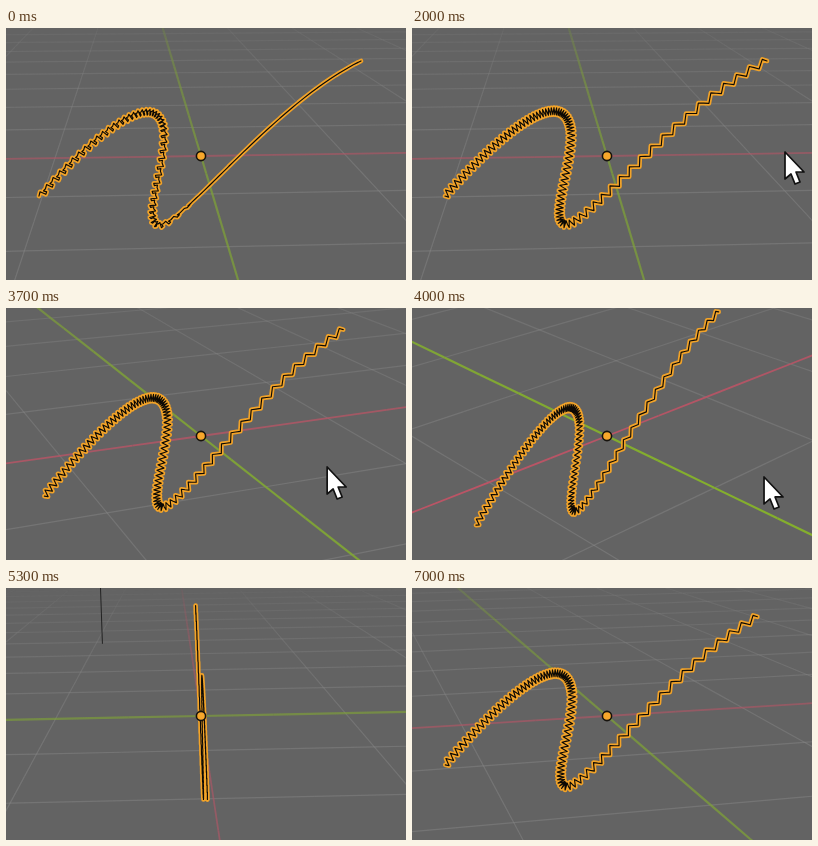
These frames come from a looping animation (400x252 px, 7400 ms). An HTML page with a canvas:

```html
<!DOCTYPE html>
<html>
<head>
<meta charset="utf-8">
<style>
html, body { margin: 0; width: 100%; height: 100%; overflow: hidden; background: #636363; }
canvas { display: block; }
</style>
</head>
<body>
<canvas id="stage" width="400" height="252"></canvas>
<script>
const ctx = document.getElementById('stage').getContext('2d');
const LOOP = 7400, DIST = 1000, CELL = 145, CX = 195, CY = 128;

const clamp = (v, lo, hi) => Math.min(hi, Math.max(lo, v));
const mix = (a, b, p) => a + (b - a) * p;
const rad = deg => deg * Math.PI / 180;

// Orbit of the view: front, raised corner, side, low corner, rest
const orbit = [
  { at: 3400, yaw: 3.85, elev: 13 },
  { at: 4000, yaw: 42, elev: 25.8 },
  { at: 5300, yaw: 91.6, elev: 11.8 },
  { at: 6000, yaw: 50, elev: 9.2 },
  { at: 6800, yaw: 15.1, elev: 13.4 }
];

function viewAt(t) {
  const next = orbit.findIndex(k => k.at > t);
  const b = orbit.at(next), a = next > 0 ? orbit[next - 1] : b;
  const p = a === b ? 0 : (t - a.at) / (b.at - a.at);
  const yaw = mix(a.yaw, b.yaw, p);
  return { yaw, elev: mix(a.elev, b.elev, p), roll: .0144 * (yaw / 91.6) ** 4 };
}

// The orbit is dragged by the pointer; before that it glides twice
function pointerAt(t, view) {
  if (t < 2900) {
    const p = clamp((t - 2000) / 400, 0, 1);
    return [mix(373, 283, p), mix(124, 135, p) - 8 * Math.sin(p * Math.PI)];
  }
  if (t < 3400) {
    const p = clamp((t - 3100) / 300, 0, 1);
    return [mix(338, 290, p), mix(170, 149, p)];
  }
  const back = t > 5300 ? 1 : 0;
  return [284 + 1.62 * view.yaw - 15 * back, 149 + 1.56 * (view.elev - 13) - 11 * back];
}

// The picture moves in 100 ms steps, coarser around the turn and the end
function stepTime(t) {
  const coarse = from => Math.max(from, Math.floor(t / 300) * 300);
  if (t >= 5800) return coarse(5800);
  if (t >= 4800 && t < 5300) return coarse(4800);
  return Math.floor(t / 100) * 100;
}

// Curve seen from the front: three joined cubics, with waves on each
const controls = [
  [33, 168], [94, 99], [154, 55], [159, 104], [161, 135],
  [138, 190], [152, 196], [172, 204], [266, 76], [355, 33]
];
const WAVES = [42, 21, 21];

// Undo the front view's projection onto the upright plane
function toWorld(sx, sy) {
  const u = sx - CX, v = CY - sy, k = 1 + (.065 * u - .224 * v) / DIST;
  const x = u * k / .9977;
  return [x, 0, (k * v - .015 * x) / .974];
}

function offsetPoint(part, t, off) {
  const [a, b, c, d] = controls.slice(part * 3, part * 3 + 4), s = 1 - t;
  const at = i => s*s*s*a[i] + 3*s*s*t*b[i] + 3*s*t*t*c[i] + t*t*t*d[i];
  const slope = i => s*s*(b[i]-a[i]) + 2*s*t*(c[i]-b[i]) + t*t*(d[i]-c[i]);
  const dx = slope(0), dy = slope(1), len = Math.hypot(dx, dy);
  return toWorld(at(0) - dy / len * off, at(1) + dx / len * off);
}

// Repeat a pattern of [phase, offset] along the curve
function buildCurve(pattern, density, strength) {
  const pts = [];
  WAVES.forEach((waves, part) => {
    const n = waves * density;
    for (let i = 0; i < n; i++) for (const [phase, off] of pattern) {
      const t = (i + phase) / n;
      pts.push(offsetPoint(part, t, off * strength(part + t)));
    }
  });
  pts.push(toWorld(355, 33));
  return pts;
}

const zigzag = buildCurve([[0, 0], [.25, 3.5], [.75, -3.5]], 1, () => 1);
const barbed = buildCurve([[0, 0], [.4, -2], [.6, 4], [.85, 3], [.7, 0]], 2 / 3,
  s => clamp((2.33 - s) * 3, 0, 1));

function camera({ yaw, elev, roll }) {
  const ca = Math.cos(rad(yaw)), sa = Math.sin(rad(yaw));
  const ce = Math.cos(rad(elev)), se = Math.sin(rad(elev));
  return ([x, y, z]) => {
    const h = x * ca - y * sa, d = x * sa + y * ca;
    const depth = DIST + d * ce - z * se, k = DIST / depth;
    const px = h * k, py = (z * ce + d * se) * k;
    return [CX + px - py * roll, CY - py - px * roll, depth];
  };
}

function stroke(pts, color, width) {
  ctx.beginPath();
  pts.forEach(p => ctx.lineTo(p[0], p[1]));
  ctx.strokeStyle = color;
  ctx.lineWidth = width;
  ctx.stroke();
}

// Floor line in short pieces that fade with distance
function floorLine(project, place, rgb, strength, width) {
  const step = CELL / 2;
  for (let i = -28; i < 32; i++) {
    const a = project(place(i * step)), b = project(place((i + 1) * step));
    if (a[2] < 60 || b[2] < 60) continue;
    const alpha = strength * clamp(1.1 - (a[2] - 700) / 1900, 0, 1);
    if (alpha > 0) stroke([a, b], `rgba(${rgb},${alpha})`, width);
  }
}

function drawFloor(project, elev) {
  for (let k = -12; k <= 14; k++) if (k) {
    floorLine(project, s => [s, k * CELL, 0], '150,150,150', .34, 1.2);
    floorLine(project, s => [k * CELL, s, 0], '150,150,150', .34, 1.2);
  }
  const glow = Math.min(1, .15 + 1.9 * Math.sin(rad(elev)));
  floorLine(project, s => [s, 0, 0], '190,84,102', glow, 1.8);
  floorLine(project, s => [0, s, 0], '134,178,44', glow, 2.2);
}

function drawPointer([x, y]) {
  ctx.save();
  ctx.translate(x, y);
  const arrow = new Path2D('M0 0V27L6 22L10 32L15 30L11 20H19Z');
  ctx.fillStyle = '#fff';
  ctx.fill(arrow);
  ctx.strokeStyle = '#111';
  ctx.lineWidth = 1.7;
  ctx.stroke(arrow);
  ctx.restore();
}

function drawOrigin() {
  ctx.beginPath();
  ctx.arc(CX, CY, 4.6, 0, 7);
  ctx.fillStyle = '#f7a72b';
  ctx.fill();
  ctx.strokeStyle = '#15120c';
  ctx.lineWidth = 1.6;
  ctx.stroke();
}

function draw(t) {
  const time = stepTime(t), view = viewAt(time), project = camera(view);
  ctx.lineJoin = 'round';
  ctx.lineCap = 'butt';
  ctx.fillStyle = '#636363';
  ctx.fillRect(0, 0, 400, 252);
  drawFloor(project, view.elev);

  // Upright line of the lamp
  stroke([project([560, 135, 0]), project([560, 135, 700])], '#222', 1);

  const curve = (time < 600 ? barbed : zigzag).map(project);
  ctx.lineCap = 'round';
  stroke(curve, '#f2a328', 4.6);
  stroke(curve, '#0c0904', 1.15);
  drawOrigin();
  if (time >= 2000 && t < 7000) drawPointer(pointerAt(time, view));
}

const start = performance.now();
function frame() {
  draw((performance.now() - start) % LOOP);
  requestAnimationFrame(frame);
}
frame();
</script>
</body>
</html>
```
